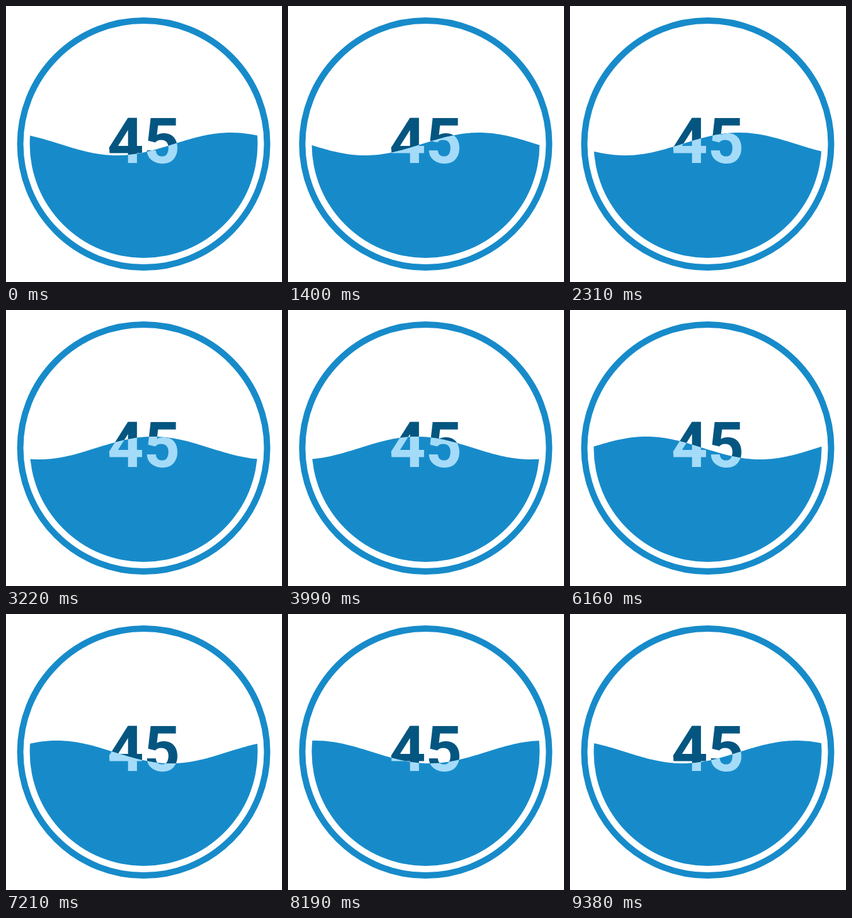
An HTML page that plays this animation: 436 px wide and 436 px high, repeating every 9450 ms.

```html
<!DOCTYPE html>
<html lang="en">
<head>
<meta charset="utf-8">
<title>Liquid gauge</title>
<style>
  html, body { margin: 0; height: 100%; overflow: hidden; background: #fff; }
  svg { display: block; width: 100%; height: 100%; }
  text { font: bold 100px Roboto, sans-serif; text-anchor: middle; }
</style>
</head>
<body>
<svg viewBox="0 0 436 436">
  <defs>
    <clipPath id="water"><path id="wave"/></clipPath>
  </defs>
  <g fill="#178bca">
    <circle cx="217.5" cy="218" r="195" fill="none" stroke="#178bca" stroke-width="10"/>
    <text x="217.5" y="248" fill="#045681">45</text>
    <g clip-path="url(#water)">
      <circle cx="217.5" cy="218" r="180"/>
      <text x="217.5" y="248" fill="#a4dbf8">45</text>
    </g>
  </g>
</svg>
<script>
  const LOOP = 9450, STEP = 70;
  const LEVEL = 218, AMPLITUDE = 18, WAVELENGTH = 360, FIRST_CREST = 355;
  const wave = document.getElementById('wave');

  function draw(now) {
    const time = Math.floor((now % LOOP) / STEP) * STEP;
    const crest = FIRST_CREST - WAVELENGTH * time / LOOP;
    let path = 'M30 436';
    for (let x = 30; x <= 406; x += 4) {
      const y = LEVEL - AMPLITUDE * Math.cos(2 * Math.PI * (x - crest) / WAVELENGTH);
      path += `L${x} ${y.toFixed(2)}`;
    }
    wave.setAttribute('d', path + 'V436Z');
  }

  const start = performance.now();
  function tick() {
    draw(performance.now() - start);
    requestAnimationFrame(tick);
  }
  tick();
</script>
</body>
</html>
```
